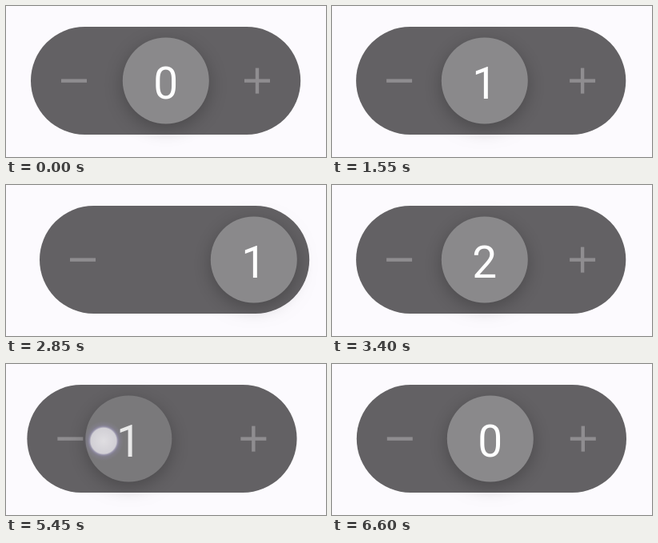
Write an HTML page with a canvas that moves like this. It is 400 px wide and 189 px high and loops after 6.7 s.

```html
<!DOCTYPE html>
<html lang="en">
<head>
<meta charset="utf-8">
<title>Drag stepper</title>
<style>
html, body { margin: 0; width: 100%; height: 100%; overflow: hidden; background: #fcfafe; }
canvas { display: block; }
</style>
</head>
<body>
<canvas width="400" height="189"></canvas>
<script>
const ctx = document.querySelector('canvas').getContext('2d');
const LOOP = 6700, CX = 199.8, CY = 93.5;
const REACH = 110, SWIPE = 400, REST = 100;

// The finger lands REST ms before go, swipes for SWIPE ms, and the knob springs back at release
const drags = [
  { dir: 1, go: 554, release: 1125 },
  { dir: 1, go: 2249, release: 2975 },
  { dir: -1, go: 3960, release: 4625 },
  { dir: -1, go: 5288, release: 6035 }
];

const clamp = v => Math.max(0, Math.min(1, v));
const smooth = v => v * v * (3 - 2 * v);

// Underdamped return to rest, damping ratio 0.5
function spring(ms) {
  const p = ms / 100, d = 1 / Math.sqrt(3);
  return Math.exp(-d * p) * (Math.cos(p) + d * Math.sin(p));
}

function stateAt(t) {
  const s = { offset: 0, value: 0, press: 0, touch: null };
  for (const { dir, go, release } of drags) {
    const down = go - REST, up = go + SWIPE;
    if (t < down) break;
    const k = smooth(clamp((t - go) / SWIPE));
    s.offset = dir * REACH * k ** .85;
    s.press = clamp((t - down) / 100) * (1 - clamp((t - up) / 130));
    s.touch = t < up ? { x: 200 + dir * 215 * k, y: 92 - dir * (2 + 6 * k) } : null;
    if (t >= release) {
      s.value += dir;
      s.offset *= spring(t - release);
    }
  }
  return s;
}

function disc(x, y, r, fill) {
  ctx.fillStyle = fill;
  ctx.beginPath();
  ctx.arc(x, y, r, 0, 2 * Math.PI);
  ctx.fill();
}

function drawTouch({ x, y }) {
  const g = ctx.createRadialGradient(x, y, 0, x, y, 25);
  g.addColorStop(0, 'rgba(246,244,248,.82)');
  g.addColorStop(.64, 'rgba(240,238,245,.74)');
  g.addColorStop(.72, 'rgba(165,158,200,.5)');
  g.addColorStop(.8, 'rgba(150,142,185,.22)');
  g.addColorStop(1, 'rgba(150,142,185,0)');
  disc(x, y, 25, g);
}

function draw(t) {
  const { offset, value, press, touch } = stateAt(t);
  const shift = offset * .1, x = CX + offset;
  ctx.fillStyle = '#fcfafe';
  ctx.fillRect(0, 0, 400, 189);

  ctx.fillStyle = '#636164';
  ctx.beginPath();
  ctx.roundRect(31 + shift, 26, 337.2, 135, 67.5);
  ctx.fill();

  ctx.fillStyle = '#8f8d90';
  ctx.fillRect(69 + shift, 91.4, 32, 4.4);
  ctx.fillRect(298 + shift, 91.4, 32, 4.4);
  ctx.fillRect(311.8 + shift, 77.6, 4.4, 32);

  const grey = Math.round(138 - 16 * press);
  ctx.save();
  ctx.shadowColor = 'rgba(0,0,0,.25)';
  ctx.shadowBlur = 22;
  ctx.shadowOffsetY = 6;
  disc(x, CY, 54, `rgb(${grey},${grey - 1},${grey + 1})`);
  ctx.restore();

  const ink = Math.round(255 - 22 * press);
  ctx.fillStyle = `rgb(${ink},${ink},${ink})`;
  ctx.font = '55px Roboto, sans-serif';
  ctx.textAlign = 'center';
  ctx.fillText(value, x, 116);

  if (touch) drawTouch(touch);
}

const start = performance.now();
function frame() {
  draw((performance.now() - start) % LOOP);
  requestAnimationFrame(frame);
}
frame();
</script>
</body>
</html>
```
